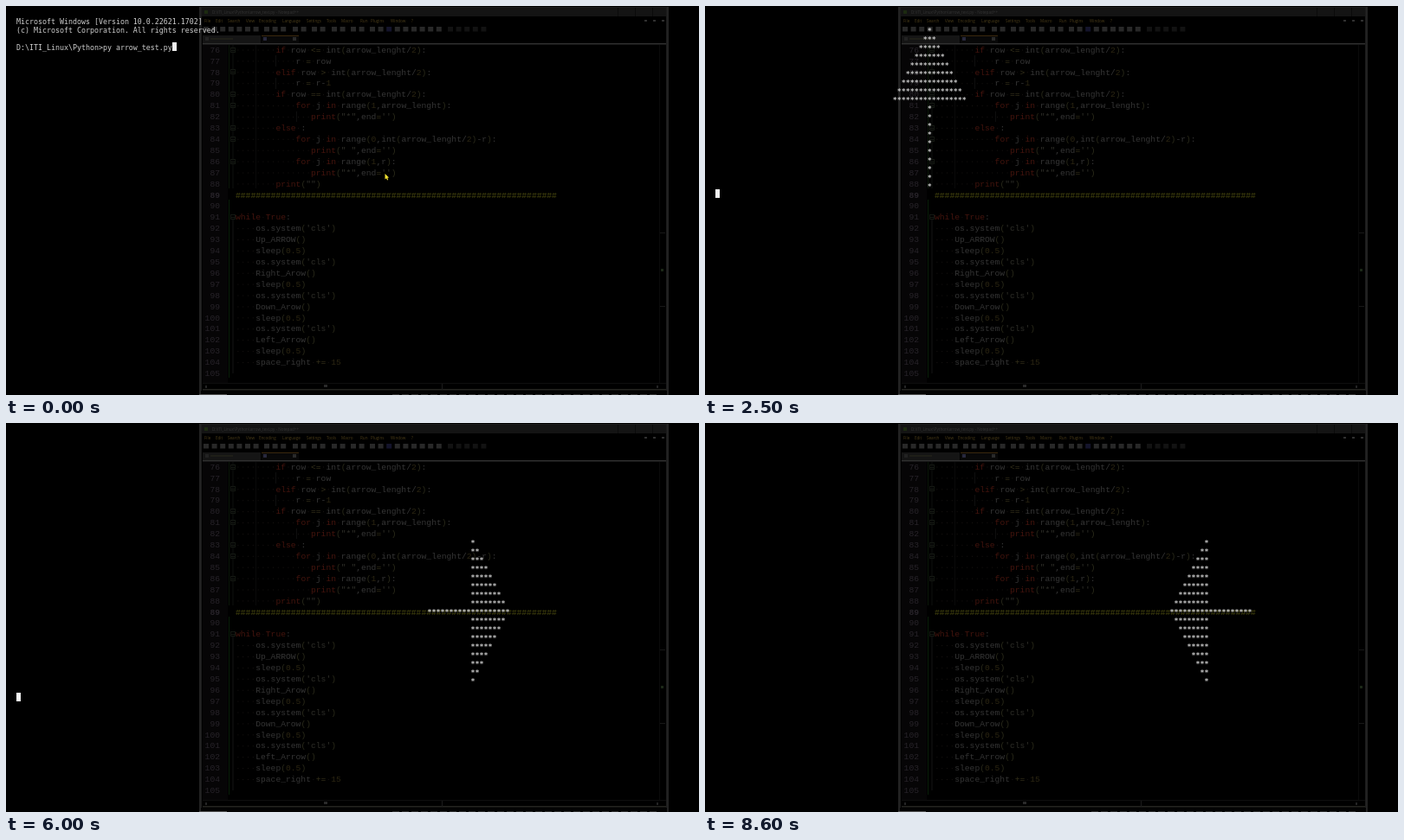
Animation of 800 by 450 pixels, one loop 8.7 s. Source, as an HTML page with a canvas:

```html
<!DOCTYPE html>
<html>
<head>
<meta charset="utf-8">
<style>
html, body { margin: 0; width: 100%; height: 100%; overflow: hidden; background: #000; }
canvas { display: block; }
</style>
</head>
<body>
<canvas id="stage" width="800" height="450"></canvas>
<script>
const LOOP = 8700, STEP = 100;
const FIRST = 380, BEAT = 257;         // first arrow, time per arrow
const CELL = 4.995, ROW = 10, LEFT = 12, TOP = 17.6;
const CODE_X = 265, CODE_Y = 50.5, CODE_W = 5.8, LINE = 12.91;

const CODE = `        if row <= int(arrow_lenght/2):
            r = row
        elif row > int(arrow_lenght/2):
            r = r-1
        if row == int(arrow_lenght/2):
            for j in range(1,arrow_lenght):
               print("*",end='')
        else :
            for j in range(0,int(arrow_lenght/2)-r):
               print(" ",end='')
            for j in range(1,r):
               print("*",end='')
        print("")
${'#'.repeat(64)}

while True:
    os.system('cls')
    Up_ARROW()
    sleep(0.5)
    os.system('cls')
    Right_Arow()
    sleep(0.5)
    os.system('cls')
    Down_Arow()
    sleep(0.5)
    os.system('cls')
    Left_Arrow()
    sleep(0.5)
    space_right += 15
`.split('\n');

const TOKENS = /"[^"]*"|'[^']*'|#+|\w+(?:\.5)?|\s|[^\w\s]/g;
const KEYWORD = /^(if|elif|else|for|in|print|while|True)$/;

const ctx = document.getElementById('stage').getContext('2d');

function rect(x, y, w, h, color) {
  ctx.fillStyle = color;
  ctx.fillRect(x, y, w, h);
}

function text(str, x, y, color) {
  ctx.fillStyle = color;
  ctx.fillText(str, x, y);
}

function tokenColor(t) {
  if (KEYWORD.test(t)) return '#44140d';
  if (/^#/.test(t)) return '#3a3a0c';
  if (/^\d/.test(t)) return '#2c2612';
  if (/^["']/.test(t)) return '#2e2e28';
  if (/[<>=+]/.test(t)) return '#34301a';
  if (/[()]/.test(t)) return '#2a2a1a';
  return '#353535';
}

function drawChrome() {
  rect(223, 1, 542, 449, '#1c1c1c');
  rect(226, 12, 536, 433, '#000');
  rect(226, 2, 536, 10, '#141414');
  rect(223, 445, 542, 5, '#030303');
  rect(223, 1, 2, 449, '#222');
  rect(763, 1, 2, 449, '#222');

  ctx.font = '4.6px "Open Sans", sans-serif';
  rect(229, 5, 4, 4, '#1c2a10');
  text('D:\\ITI_Linux\\Python\\arrow_test.py - Notepad++', 238, 8.6, '#343434');
  const menu = { File: 229, Edit: 242, Search: 256, View: 277, Encoding: 292, Language: 319,
    Settings: 347, Tools: 370, Macro: 387, Run: 409, Plugins: 421, Window: 444, '?': 468 };
  for (const name in menu) text(name, menu[name], 19.3, '#4a3c18');
  for (const x of [706, 726, 746]) rect(x, 2, 1, 10, '#0a0a0a');
  for (const x of [737, 747, 757]) rect(x, 16, 3, 2, '#303030');

  // toolbar groups: left edge and number of icons
  const groups = [[228, 7], [298, 3], [331, 2], [353, 2], [376, 2], [398, 2], [420, 9], [510, 5]];
  for (const [x, count] of groups) {
    for (let i = 0; i < count; i++) {
      rect(x + i * 9.6, 24, 6, 5.5, x > 500 ? '#121212' : x === 420 && i === 2 ? '#14142c' : '#282828');
    }
  }

  // tabs
  rect(227, 34, 67, 9, '#151515');
  rect(230, 36, 4, 4, '#222');
  rect(236, 37, 26, 2, '#1e1e18');
  rect(295, 34, 43, 9, '#080808');
  rect(295, 34, 43, 1, '#3a280e');
  rect(297, 36, 4, 4, '#28283c');
  rect(331, 36, 4, 4, '#2a2a2a');
  rect(227, 43, 535, 1.5, '#303030');

  // scroll bars
  rect(754, 45, 1, 391, '#0b0b0b');
  rect(755, 262, 6, 1, '#181818');
  rect(755, 347, 6, 1, '#181818');
  rect(756, 304, 3, 3, '#1c2818');
  rect(227, 436, 535, 1, '#0e0e0e');
  rect(227, 443, 535, 1.5, '#242420');
  rect(503, 437, 1, 7, '#1c1c1c');
  rect(230, 439, 2, 3, '#242424');
  rect(751, 439, 2, 3, '#242424');
  rect(367, 438, 4, 3, '#2a2a2a');

  // status strip cut by the lower edge
  rect(223, 449, 32, 1, '#505050');
  for (let x = 446; x < 745; x += 11) rect(x, 449, 8, 1, '#303030');
}

function drawCode() {
  rect(227, 45, 29, 391, '#060506');
  rect(257, 45, 1, 166, '#0c180a');
  rect(257, 224, 1, 206, '#0a200a');
  rect(261.5, 45, 1, 166, '#0e100e');
  rect(261.5, 247, 1, 178, '#141414');
  rect(288, 45, 1, 166, '#0a0a0a');
  rect(311, 57, 1, 13, '#0e0e0e');
  rect(311, 83, 1, 13, '#0e0e0e');
  rect(335, 122, 1, 12, '#0e0e0e');

  CODE.forEach((line, i) => {
    const y = CODE_Y + i * LINE, base = y + 3.2;
    const num = String(76 + i);
    ctx.font = (line[0] === '#' ? 'bold ' : '') + '9.67px "Liberation Mono", monospace';
    text(num, 247 - num.length * CODE_W, base, '#28242a');
    if (/:$/.test(line)) {
      ctx.strokeStyle = '#141812';
      ctx.strokeRect(259.5, Math.round(y) - 2.5, 5, 5);
      rect(260, Math.round(y), 4, 1, '#141812');
    }
    for (const m of line.matchAll(TOKENS)) {
      const x = CODE_X + m.index * CODE_W;
      if (m[0] === ' ') rect(x + 2.4, y, 1, 1, '#181412');
      else text(m[0], x, base, tokenColor(m[0]));
    }
  });
}

function put(str, col, row) {
  text(str, LEFT + col * CELL, TOP + row * ROW + 2.9, '#d0d0d0');
}

function stars(col, row, n) {
  for (let i = 0; i < n; i++) {
    text('*', LEFT + (col + i) * CELL, TOP + row * ROW + 4.4, '#c4c4c4');
  }
}

function block(col, row) {
  rect(Math.round(LEFT + col * CELL), Math.round(TOP + row * ROW - 5.4), 5, 10, '#f2f2f2');
}

// Each shape returns the row on which the cursor is left.
const SHAPES = [
  function up(s) {
    for (let i = 0; i < 19; i++) {
      const half = i < 9 ? i : 0;
      stars(s + 19 - half, 1 + i, 2 * half + 1);
    }
    return 20;
  },
  function right(s) {
    for (let d = -8; d <= 8; d++) {
      if (d) stars(s + 30, 20 + d, 9 - Math.abs(d));
      else stars(s + 20, 20, 19);
    }
    return 30;
  },
  function down(s) {
    for (let i = 0; i < 19; i++) {
      const half = i < 10 ? 0 : 18 - i;
      stars(s + 20 - half, 21 + i, 2 * half + 1);
    }
    return 40;
  },
  function left(s) {
    for (let d = -8; d <= 8; d++) {
      if (d) stars(s + Math.abs(d), 20 + d, 9 - Math.abs(d));
      else stars(s, 20, 19);
    }
    return 30;
  }
];

const CURSOR_ON = [[2000, 3000], [3500, 6300], [6600, 6700], [7000, 7400]];

function drawTerminal(t) {
  if (t < FIRST) {
    const command = 'D:\\ITI_Linux\\Python>py arrow_test.py';
    ctx.font = '8.3px "DejaVu Sans Mono", monospace';
    put('Microsoft Windows [Version 10.0.22621.1702]', 0, 0);
    put('(c) Microsoft Corporation. All rights reserved.', 0, 1);
    put(command, 0, 3);
    if (t < 100) block(command.length, 3);
    else block(0, 4);
    return;
  }
  const n = Math.floor((t - FIRST) / BEAT);
  ctx.font = 'bold 8.3px "DejaVu Sans Mono", monospace';
  const row = SHAPES[n % 4](15 * Math.floor(n / 4));
  if (CURSOR_ON.some(([a, b]) => t >= a && t < b)) block(0, row);
}

function drawPointer(t) {
  if (t >= 1500) return;
  const x = t < 100 ? 437.5 : 438.5, y = t < 100 ? 194 : 193;
  ctx.fillStyle = '#f0e030';
  ctx.beginPath();
  for (const [dx, dy] of [[0, 0], [0, 6.5], [1.6, 5.2], [2.6, 7.6], [3.7, 7], [2.8, 4.8], [4.6, 4.6]]) {
    ctx.lineTo(x + dx, y + dy);
  }
  ctx.fill();
}

function frame(now) {
  const t = Math.floor(now % LOOP / STEP) * STEP;
  rect(0, 0, 800, 450, '#000');
  drawChrome();
  drawCode();
  drawTerminal(t);
  drawPointer(t);
  requestAnimationFrame(frame);
}
frame(performance.now());
</script>
</body>
</html>
```
